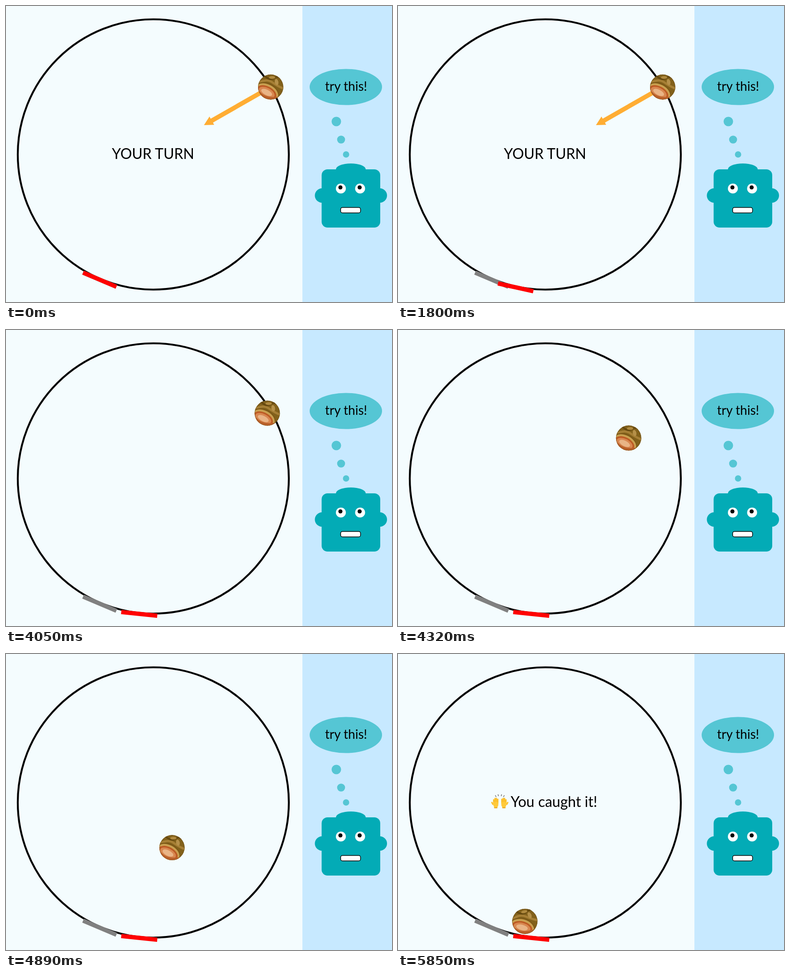
Write an HTML page that moves like this. It is 853 px wide and 656 px high and loops after 6780 ms.

```html
<!DOCTYPE html>
<html lang="en">
<head>
<meta charset="utf-8">
<title>Catch the ball</title>
<style>
  html, body { margin: 0; width: 100%; height: 100%; overflow: hidden; background: #f4fcfe; }
  svg { display: block; width: 853px; height: 656px; }
  text { font: 32px Lato, sans-serif; }
</style>
</head>
<body>
<svg viewBox="0 0 853 656">
  <defs>
    <clipPath id="disc"><circle r="28"/></clipPath>
    <rect id="paddle" x="-40" y="297" width="80" height="9.5"/>
    <g id="hand">
      <path d="M-6 2V-5M-3 1V-8M0 1V-8M3 2V-6M-8 5l-2-4" stroke="#fbc02d" stroke-width="3" stroke-linecap="round"/>
      <path d="M-7.5 1Q-2 -2 4.500 1L4 8Q2 11 2 13H-5Q-5 10 -7 7Z" fill="#ffca3a"/>
      <path d="M-5 13H2" stroke="#e59600" stroke-width="1.5"/>
    </g>
  </defs>

  <rect x="655" width="198" height="656" fill="#c7e9ff"/>
  <g fill="#55c6d4">
    <ellipse cx="751" cy="179.500" rx="80" ry="40"/>
    <circle cx="730" cy="256" r="10.500"/>
    <circle cx="740.500" cy="296" r="8.800"/>
    <circle cx="751.500" cy="329" r="7"/>
  </g>
  <text x="751.500" y="188" text-anchor="middle" style="font-size:28px">try this!</text>

  <g fill="#03abb6">
    <ellipse cx="762" cy="362" rx="33" ry="13"/>
    <circle cx="698.500" cy="420" r="16"/>
    <circle cx="826" cy="420" r="16"/>
    <rect x="697.500" y="362" width="129.500" height="129" rx="13"/>
  </g>
  <g fill="#fff">
    <circle cx="740" cy="404.500" r="11"/>
    <circle cx="782.500" cy="404.500" r="11"/>
    <rect x="739.500" y="446.500" width="44" height="12" rx="4" stroke="#000" stroke-width="1.500"/>
  </g>
  <circle cx="739" cy="402" r="4.500"/>
  <circle cx="781.500" cy="402" r="4.500"/>

  <circle cx="325.500" cy="329" r="299.500" fill="none" stroke="#000" stroke-width="4.200"/>
  <use href="#paddle" fill="#808080" transform="translate(325.5 329) rotate(23.1)"/>
  <use href="#paddle" id="player" fill="red"/>

  <g id="aim">
    <path d="M0 -5H150V-10.500L170 0L150 10.500V5H0Z" fill="#ffad33" transform="translate(585 179.5) rotate(150.200)"/>
    <text x="325" y="339" text-anchor="middle">YOUR TURN</text>
  </g>

  <g id="ball">
    <g clip-path="url(#disc)" fill="none">
      <circle r="28" fill="#82611b"/>
      <path d="M-28 -8Q-10 -20 4 -10T30 4" stroke="#a67f35" stroke-width="5"/>
      <path d="M-14 -25Q-2 -13 8 -20T26 -16" stroke="#66490f" stroke-width="4"/>
      <ellipse cx="3" cy="-21" rx="7" ry="3" fill="#b08a3f"/>
      <ellipse cx="15" cy="-8" rx="4" ry="7" fill="#b59049" transform="rotate(-12)"/>
      <g transform="translate(-9 12) rotate(27)">
        <ellipse rx="29" ry="21" fill="#7d5a18"/>
        <ellipse rx="27" ry="18" fill="#c9a050"/>
        <ellipse rx="23" ry="13.500" fill="#bd5a24"/>
        <ellipse rx="19" ry="10" fill="#d88750"/>
        <ellipse rx="13" ry="6" fill="#e9b486"/>
      </g>
      <path d="M-26 12Q-12 28 16 24" stroke="#b9602a" stroke-width="5"/>
      <circle r="27.500" stroke="#5d4014" stroke-opacity=".5"/>
    </g>
  </g>

  <g id="caught">
    <use href="#hand" x="217.500" y="328"/>
    <use href="#hand" transform="translate(232.500 328) scale(-1 1)"/>
    <path d="M215 313l2 4M221 311l1 4M229 311l-1 4M235 313l-2 4" stroke="#555" stroke-width="1.200"/>
    <text x="249" y="339">You caught it!</text>
  </g>
</svg>
<script>
const LOOP = 6780, STEP = 30, LAUNCH = 4020, FLIGHT = 1215;
const [player, aim, ball, caught] =
  ["player", "aim", "ball", "caught"].map(id => document.getElementById(id));

const ease = (t, from, to) => {
  const p = Math.min(1, Math.max(0, (t - from) / (to - from)));
  return (1 - Math.cos(Math.PI * p)) / 2;
};
const show = (el, on) => el.setAttribute("visibility", on ? "visible" : "hidden");

function draw(t) {
  const angle = 23.1 - 22.8 * ease(t, 890, 2800) + 5.6 * ease(t, 2940, 3630);
  player.setAttribute("transform", `translate(325.5 329) rotate(${angle})`);

  // Thrown along the arrow, then pulled down by gravity.
  const dt = Math.min(FLIGHT, Math.max(0, t - LAUNCH));
  const landed = dt === FLIGHT;
  const x = 585 - 0.2507 * dt;
  const y = 179.5 + 0.1532 * dt + 0.0001536 * dt * dt;
  ball.setAttribute("transform", `translate(${x} ${y}) rotate(${landed ? -12 : 0})`);

  show(aim, t < LAUNCH);
  show(caught, landed);
}

let start;
function tick(now) {
  start ??= now;
  draw(Math.floor((now - start) % LOOP / STEP) * STEP);
  requestAnimationFrame(tick);
}
draw(0);
requestAnimationFrame(tick);
</script>
</body>
</html>
```
